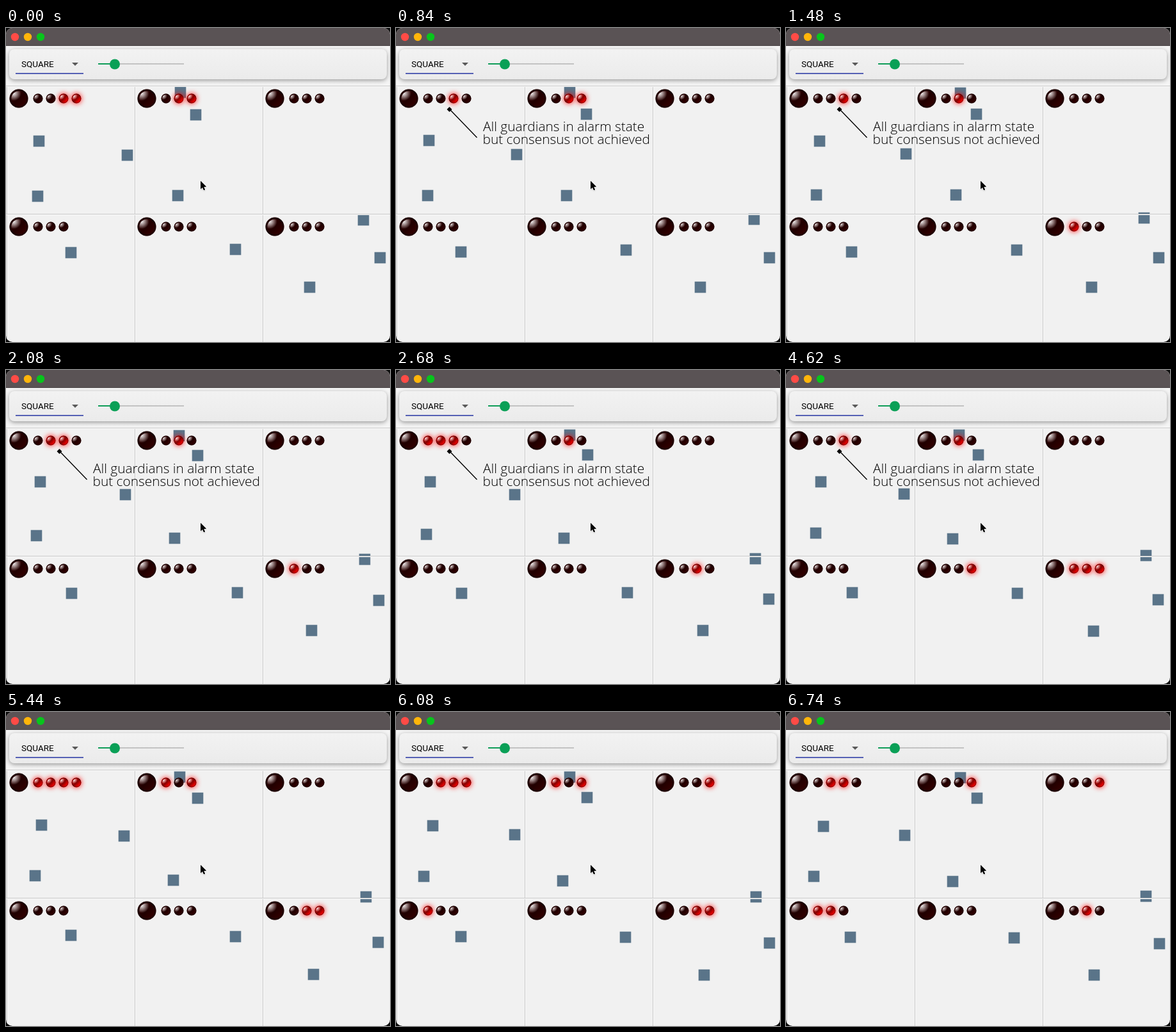
An HTML page with a canvas for the animation above (6760 ms loop, 600 by 490 pixels).

```html
<!DOCTYPE html>
<html lang="en">
<head>
<meta charset="utf-8">
<title>Guardians</title>
<style>
  html, body { margin: 0; width: 100%; height: 100%; overflow: hidden; background: #0b0b0b; }
  canvas { display: block; width: 600px; height: 490px; }
</style>
</head>
<body>
<canvas id="stage" width="600" height="490"></canvas>
<script>
const ctx = document.getElementById('stage').getContext('2d');
const LOOP = 6760, STEP = 20, TURN = 3840;
const NOTE = [740, 5040];
const VISITOR = [3260, 4240];

// Each agent drifts from a start through a turning point to an end
const agents = [
  [51, 176, 53, 173, 58, 178],
  [189, 198, 184, 192, 185, 192],
  [49, 262, 46, 254, 43, 256],
  [272, 100, 270, 101, 272, 102],
  [296, 135, 300, 132, 298, 134],
  [268, 261, 260, 262, 260, 264],
  [101, 350, 103, 346, 100, 351],
  [358, 345, 362, 347, 356, 352],
  [558, 299, 561, 291, 562, 287],
  [584, 358, 580, 358, 583, 361],
  [474, 404, 480, 406, 481, 410]
];

// Alarm score per cell: one hex digit of lit lamps for each beat
const BEATS = [0, 1480, 2680, 3840, 4620, 5440, 6740];
const scores = ['32e22f6', '3223251', '0000001', '0000006', '0000100', '0426732'];

const noise = n => {
  const v = Math.sin(n * 12.9898) * 43758.5453;
  return v - Math.floor(v);
};

function disc(x, y, r, fill) {
  ctx.fillStyle = fill;
  ctx.beginPath();
  ctx.arc(x, y, r, 0, Math.PI * 2);
  ctx.fill();
}

function rect(x, y, w, h, fill) {
  ctx.fillStyle = fill;
  ctx.fillRect(x, y, w, h);
}

function poly(points, fill) {
  ctx.fillStyle = fill;
  ctx.beginPath();
  points.forEach(([x, y]) => ctx.lineTo(x, y));
  ctx.closePath();
  ctx.fill();
}

function shade(gradient, ...colors) {
  colors.forEach((c, i) => gradient.addColorStop(i / (colors.length - 1), c));
  return gradient;
}

function lamp(x, y, r, on) {
  const d = r * .68;
  const body = shade(ctx.createLinearGradient(x - d, y - d, x + d, y + d),
    ...(on ? ['#c80000', '#880000', '#ff0000'] : ['#330000', '#210000', '#330000']));
  ctx.save();
  if (on) {
    ctx.shadowColor = '#ff0000';
    ctx.shadowBlur = 8;
  }
  disc(x, y, r, body);
  ctx.restore();
  // inner shadow, then the glossy spot
  disc(x, y, r, shade(ctx.createRadialGradient(x, y, r * .75, x, y, r),
    'rgba(0,0,0,0)', 'rgba(0,0,0,.5)'));
  const h = r * .55, g = r * .8;
  disc(x, y, g, shade(ctx.createRadialGradient(x - h, y - h, 0, x - h, y - h, g),
    'rgba(255,255,255,.95)', 'rgba(255,255,255,0)'));
}

function windowFrame() {
  rect(0, 0, 600, 490, '#f1f1f1');
  rect(0, 0, 600, 28, '#5a5355');
  rect(0, 27, 600, 1, '#4a4446');
  rect(0, 28, 600, 62, '#f5f5f5');
  ['#ff4b46', '#ffb50a', '#08c41c'].forEach((c, i) => disc(14 + 20 * i, 14, 6.2, c));
}

function toolbar() {
  ctx.save();
  ctx.shadowColor = 'rgba(0,0,0,.38)';
  ctx.shadowBlur = 7;
  ctx.shadowOffsetY = 2;
  ctx.fillStyle = shade(ctx.createLinearGradient(0, 33, 0, 80), '#f2f2f2', '#ebebeb');
  ctx.beginPath();
  ctx.roundRect(5, 33, 590, 47, 8);
  ctx.fill();
  ctx.restore();

  ctx.font = '13.5px Roboto, Arial, sans-serif';
  ctx.fillStyle = '#000';
  ctx.fillText('SQUARE', 24, 61);
  poly([[103, 54], [113, 54], [108, 59]], '#595959');
  rect(15, 70, 106, 2, '#5560b4');

  rect(144, 55, 134, 2, '#c3c3c3');
  rect(144, 55, 26, 2, '#0f9d58');
  disc(170, 56.5, 8, '#0aa057');
}

function square(x, y) {
  rect(x - 8.3, y - 8.3, 17.6, 17.6, '#5a7489');
}

function squares(t) {
  const half = t < TURN ? 0 : 1;
  const p = half ? (t - TURN) / (LOOP - TURN) : t / TURN;
  const sway = 2 * Math.sin(Math.PI * p);
  agents.forEach((path, n) => {
    const hop = Math.floor(t / 160) + n * 57;
    const at = axis => {
      const a = path[half * 2 + axis], b = path[half * 2 + 2 + axis];
      return Math.round(a + (b - a) * p + sway * (noise(hop + axis * 991) - .5));
    };
    square(at(0), at(1));
  });
  if (t >= VISITOR[0] && t < VISITOR[1]) square(223, 478);
}

function grid() {
  for (const x of [1, 201, 401]) {
    rect(x, 91, 1, 399, '#c9c9c9');
    rect(x + 1, 91, 1, 399, '#fafafa');
  }
  for (const y of [90, 290]) {
    rect(0, y, 600, 1, '#c9c9c9');
    rect(0, y + 1, 600, 1, '#fafafa');
  }
}

function lamps(t) {
  const i = BEATS.findLastIndex(b => t >= b);
  const next = Math.min(i + 1, BEATS.length - 1);
  const p = (t - BEATS[i]) / (BEATS[next] - BEATS[i] || LOOP);
  scores.forEach((score, c) => {
    const x = 20 + c % 3 * 200, y = 110 + Math.floor(c / 3) * 200;
    const count = c === 0 ? 4 : 3;
    lamp(x, y, 14.5, false);
    for (let k = 0; k < count; k++) {
      const flip = .35 + .3 * noise(c * 31 + k * 7 + i);
      const lit = parseInt(score[p < flip ? i : next], 16);
      lamp(x + 30 + 20 * k, y, 7.5, lit >> (count - 1 - k) & 1);
    }
  });
}

function note() {
  ctx.strokeStyle = '#000';
  ctx.lineWidth = 1.4;
  ctx.beginPath();
  ctx.moveTo(84, 127);
  ctx.lineTo(126.5, 171);
  ctx.stroke();
  poly([[83.5, 123], [87.5, 127], [83.5, 131], [79.5, 127]], '#000');
  ctx.font = '300 20.85px "Open Sans", "Noto Sans", sans-serif';
  ctx.fillStyle = '#000';
  ctx.fillText('All guardians in alarm state', 136, 161);
  ctx.fillText('but consensus not achieved', 135.5, 180.5);
}

function pointer() {
  const arrow = [[0, 0], [0, 14], [3.2, 11.2], [5.4, 16], [7.8, 15], [5.7, 10.3], [10, 10]];
  ctx.save();
  ctx.translate(304, 238.6);
  ctx.scale(.92, .92);
  ctx.shadowColor = 'rgba(0,0,0,.35)';
  ctx.shadowBlur = 2;
  ctx.shadowOffsetY = 1;
  poly(arrow, '#000');
  ctx.shadowColor = 'transparent';
  ctx.strokeStyle = '#fff';
  ctx.lineWidth = 1.6;
  ctx.stroke();
  poly(arrow, '#000');
  ctx.restore();
}

function draw(t) {
  rect(0, 0, 600, 490, '#0b0b0b');
  ctx.save();
  ctx.beginPath();
  ctx.roundRect(0, 0, 600, 490, 10);
  ctx.clip();
  windowFrame();
  toolbar();
  squares(t);
  grid();
  lamps(t);
  if (t >= NOTE[0] && t < NOTE[1]) note();
  pointer();
  ctx.restore();
}

const start = performance.now();
function tick() {
  const t = (performance.now() - start) % LOOP;
  draw(Math.floor(t / STEP) * STEP);
  requestAnimationFrame(tick);
}
tick();
</script>
</body>
</html>
```
